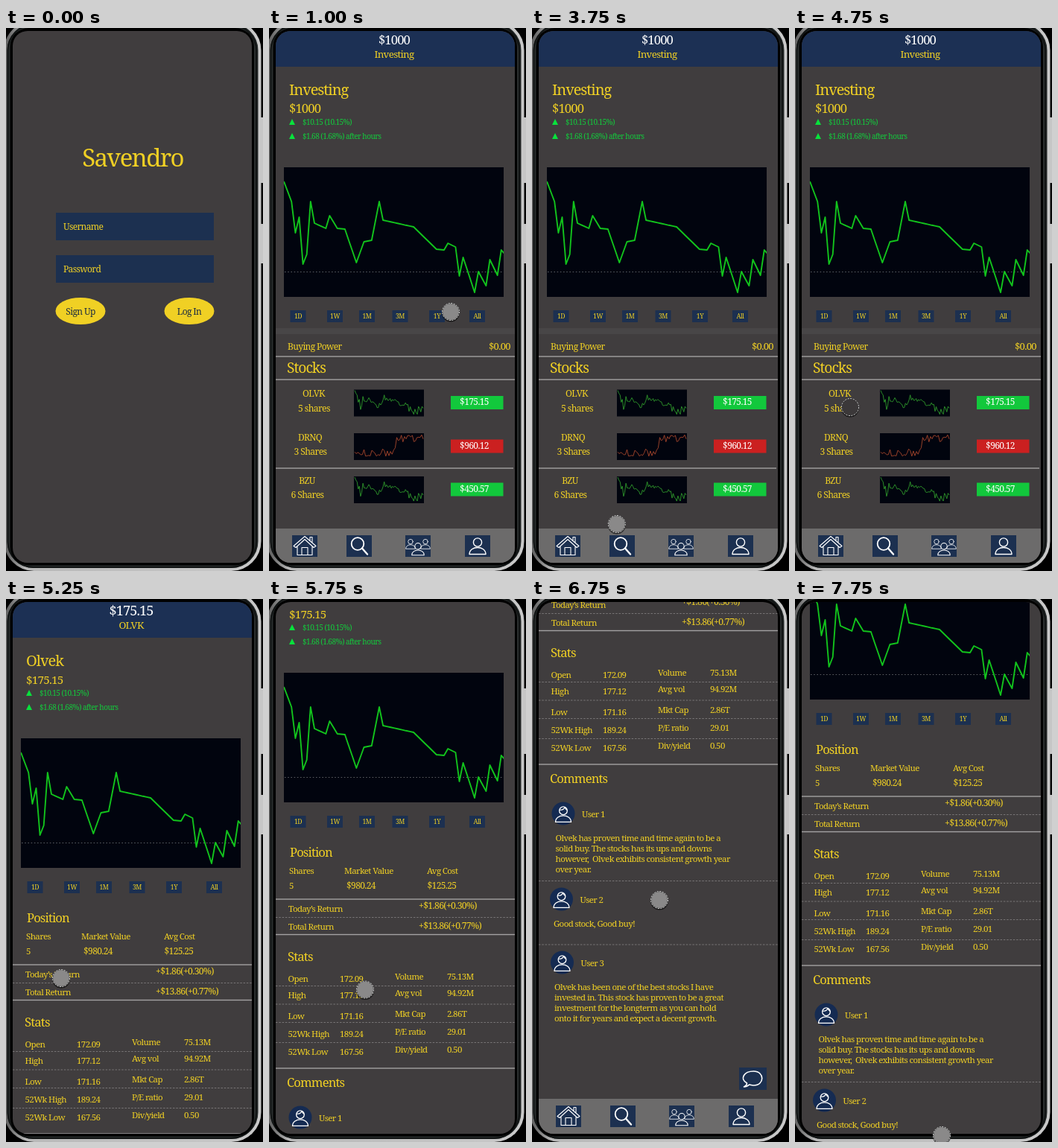
These frames come from a looping animation (345x729 px, 8 s). An HTML page:

```html
<!DOCTYPE html>
<html lang="en">
<head>
<meta charset="utf-8">
<title>Stock app</title>
<style>
html, body { margin: 0; width: 100%; height: 100%; overflow: hidden; background: #000; }
svg { display: block; width: 100%; height: 100%; }
text { font-family: "Noto Serif", serif; letter-spacing: -0.052em; white-space: pre; }
.icon { fill: none; stroke: #fff; stroke-width: 1.4; stroke-linejoin: round; stroke-linecap: round; }
</style>
</head>
<body>
<svg id="stage" viewBox="0 0 345 729"></svg>
<script>
(() => {
const LOOP = 8000, STEP = 250;
const YELLOW = '#f0d024', NAVY = '#1c3050', GREEN = '#12c83c', RED = '#cb2020', PAGE = '#403d3e';

// Drawing helpers
const rect = (x, y, w, h, fill, more = '') =>
  `<rect x="${x}" y="${y}" width="${w}" height="${h}" fill="${fill}" ${more}/>`;
const text = (x, y, str, size = 11.5, fill = YELLOW, anchor = 'start') =>
  `<text x="${x}" y="${y}" font-size="${size}" fill="${fill}" text-anchor="${anchor}">${str}</text>`;
const mid = (x, y, str, size, fill) => text(x, y, str, size, fill, 'middle');
const rule = (y, x2 = 330) => rect(9, y - .7, x2 - 9, 1.4, '#a3a1a2');
const dashes = y =>
  `<path d="M9 ${y}H330" stroke="#777475" stroke-width="1" stroke-dasharray="2.5 1.8"/>`;
const at = (x, y, body, scale = 1) => `<g transform="translate(${x} ${y}) scale(${scale})">${body}</g>`;
const stroke = (d, width = 1.4) => `<path class="icon" d="${d}" style="stroke-width:${width}"/>`;

// Maths helpers
const smooth = p => { p = Math.min(1, Math.max(0, p)); return p * p * (3 - 2 * p); };
const noise = i => { const s = Math.sin(i * 12.9898 + 4) * 43758.5453; return s - Math.floor(s) - .5; };

// Linear interpolation through keys of the form [position, ...values]
function track(keys, pos) {
  const i = keys.findIndex(k => k[0] >= pos);
  if (i < 1) return (i ? keys[keys.length - 1] : keys[0]).slice(1);
  const a = keys[i - 1], b = keys[i], p = (pos - a[0]) / (b[0] - a[0]);
  return a.slice(1).map((v, j) => v + (b[j + 1] - v) * p);
}

// Charts: turning points as [sample, y]
const turns = [[0, 206], [2, 233], [3, 275], [4, 254], [5, 317], [6, 304], [7, 233], [8, 262], [11, 269],
  [12, 252], [14, 269], [16, 270], [19, 315], [21, 287], [23, 285], [25, 233], [26, 258], [34, 267],
  [40, 297], [42, 298], [43, 289], [45, 294], [46, 333], [47, 308], [50, 355], [51, 327], [53, 346],
  [54, 311], [56, 332], [57, 298], [58, 304]];
const samples = (n, f) => Array.from({ length: n }, (_, i) => f(i));
const prices = samples(59, i => track(turns, i)[0]);
const falling = prices.map((y, i) => (y - 200) * .22 + noise(i) * 4);
const rising = samples(45, i => 26 - 19 * smooth((i - 24) / 4) + noise(i) * 10);

const line = (ys, dx, color, width) =>
  `<polyline points="${ys.map((y, i) => `${(i * dx).toFixed(1)},${y.toFixed(1)}`).join(' ')}" fill="none"
    stroke="${color}" stroke-width="${width}" stroke-linejoin="round"/>`;

const chart = rect(20, 187, 295, 174, '#01040e') +
  '<path d="M21 327.5H315" stroke="#5a5d62" stroke-dasharray="1.6 2.6"/>' +
  `<g clip-path="url(#chartBox)">${at(20, 0, line(prices, 5.12, '#12c41c', 1.9))}</g>`;

const mini = (y, up) => {
  const ys = up ? falling : rising;
  return rect(114, y, 94, 36, '#01040e') +
    at(115, y, line(ys, 92 / (ys.length - 1), up ? '#2f9a2c' : '#a9472c', .9));
};

// Icons
const person = '<circle class="icon" cy="-5" r="5.6"/>' + stroke('M-11 11C-11-1 11-1 11 11Z');
const house = stroke('M-15 0L0-13L15 0L12 2L0-9L-12 2ZM-10 1V12H10V1M-4 12V2H4V12M7-8V-12H10V-5', 1.1);
const lens = '<circle class="icon" cx="-2" cy="-3" r="8.3" style="stroke-width:1.8"/>' + stroke('M4 3L11 11', 2.4);
const crowd = at(-10, -3, person, .58) + at(10, -3, person, .58) + at(0, 4, person, .75);
const bubble = stroke('M-8 6C-18 0-12-10 1-10C16-10 16 9 1 9C-2 9-4 8-5 8Q-8 11-12 11Q-8 9-8 6Z', 1.6);
const face = '<circle r="15.5" fill="#152b52"/>' + at(0, 1, person + stroke('M-5-6Q1-6 2-10Q3-7 5-6', 1.1), .95);

const navBar = (x, y) => rect(9, y, 321, 48, '#6c6b6b') +
  [[48, house], [121, lens], [200, crowd], [280, person]].map(([cx, icon]) =>
    rect(cx + x - 17, y + 9, 34, 29, NAVY) + at(cx + x, y + 23.5, icon)).join('');

// Pages
const login = mid(170, 186, 'Savendro', 33) +
  [['Username', 248], ['Password', 305]].map(([s, y]) =>
    rect(67, y, 212, 37, NAVY) + text(77, y + 23, s, 12)).join('') +
  [['Sign Up', 100], ['Log In', 246]].map(([s, x]) =>
    `<ellipse cx="${x}" cy="380" rx="33.5" ry="18" fill="${YELLOW}"/>` + mid(x, 384.5, s, 12, '#1c2c40')).join('');

const gain = (y, s) =>
  `<path d="M27 ${y + 4}L31 ${y - 4}L35 ${y + 4}Z" fill="#08e23c"/>` + text(45, y + 4, s, 10, '#12cc3c');

const overview = (price, size, label, name, sumSize) =>
  rect(9, 0, 321, 52, '#1c3054') +
  mid(168, 21.5, price, size, '#fff') + mid(168, 40, label, 13.4) +
  text(27, 90, name, 20) + text(27, 114, price, sumSize) +
  gain(126, '$10.15 (10.15%)') + gain(145, '$1.68 (1.68%) after hours') + chart +
  [['1D', 39], ['1W', 88.5], ['1M', 131.5], ['3M', 176], ['1Y', 225.5], ['All', 279.5]].map(([s, x]) =>
    rect(x - 10.5, 379, 21, 16, NAVY) + mid(x, 390, s, 8.6)).join('');

const stock = (x, y, name, count, up, price) =>
  mid(x, y, name, 12) + mid(x + .5, y + 19.5, count, 12.2) + mini(y - 9.5, up) +
  rect(244, y - 1, 70.5, 18, up ? GREEN : RED) + mid(275.5, y + 11, price, 12, '#fff');

const home = overview('$1000', 16.6, 'Investing', 'Investing', 16.6) +
  rect(9, 403, 321, 8, '#484647') +
  text(25, 431.5, 'Buying Power', 12) + text(295, 431.5, '$0.00', 13) + rule(441) +
  text(24, 463, 'Stocks', 19.3) + rule(472) +
  stock(60, 495, 'OLVK', '5 shares', true, '$175.15') +
  stock(55, 553.5, 'DRNQ', '3 Shares', false, '$960.12') + rule(591, 328) +
  stock(51, 611.5, 'BZU', '6 Shares', true, '$450.57') +
  navBar(0, 672);

const stats = [
  ['Open', '172.09', 602, 'Volume', '75.13M'],
  ['High', '177.12', 624, 'Avg vol', '94.92M'],
  ['Low', '171.16', 651.5, 'Mkt Cap', '2.86T'],
  ['52Wk High', '189.24', 675.5, 'P/E ratio', '29.01'],
  ['52Wk Low', '167.56', 700, 'Div/yield', '0.50']
].map(([a, b, y, c, d]) =>
  text(25.5, y, a) + text(95, y, b) + text(169, y - 2.6, c) + text(239, y - 2.6, d)).join('');

const comment = (x, y, user, lines) => at(x, y, face) + text(x + 25, y + 5, user) +
  lines.map((s, i) => text(x - 10.5, y + 36.5 + i * 14.3, s)).join('');

const detail = overview('$175.15', 18.3, 'OLVK', 'Olvek', 15.3) +
  text(28, 434, 'Position', 16.6) +
  text(27, 457, 'Shares') + text(101, 457, 'Market Value') + text(212, 457, 'Avg Cost') +
  text(27, 477, '5') + text(104, 477, '$980.24', 12) + text(212.5, 477, '$125.25', 12) + rule(491) +
  text(26, 508, 'Today’s Return') + text(201, 504, '+$1.86(+0.30%)', 12.2) + dashes(515.5) +
  text(26, 532, 'Total Return') + text(201, 531, '+$13.86(+0.77%)', 12.2) + rule(538.5) +
  text(25, 574, 'Stats', 16.8) + stats + [607.5, 632, 656.5, 683.5].map(dashes).join('') + rule(718) +
  text(24, 743, 'Comments', 16.6) +
  comment(42, 784, 'User 1', ['Olvek has proven time and time again to be a',
    'solid buy. The stocks has its ups and downs', 'however,  Olvek exhibits consistent growth year', 'over year.']) +
  dashes(874.5) +
  comment(39.5, 899, 'User 2', ['Good stock, Good buy!']) + dashes(960) +
  comment(40.5, 984, 'User 3', ['Olvek has been one of the best stocks I have',
    'invested in. This stock has proven to be a great', 'investment for the longterm as you can hold',
    'onto it for years and expect a decent growth.']) +
  rect(278, 1125, 37, 30, NAVY) + at(296.5, 1140, bubble) +
  navBar(1, 1167);

const phone = rect(341, 120, 4, 88, '#c6c6c6') + rect(341, 263, 4, 53, '#c6c6c6') +
  rect(-.5, -8, 341, 735, '#222626', 'rx="38" stroke="url(#metal)" stroke-width="4"') +
  rect(2.5, -4, 333.5, 728, '#2a2e2e', 'rx="34" stroke="#111414" stroke-width="2"') +
  rect(5.5, 0, 327.5, 721.5, '#000', 'rx="25"') + rect(9, 4, 321, 714, PAGE, 'rx="20"');

document.getElementById('stage').innerHTML = `
  <defs>
    <linearGradient id="metal"><stop offset=".01" stop-color="#666"/><stop offset=".08" stop-color="#b8b8b8"/>
      <stop offset="1" stop-color="#c8c8c8"/></linearGradient>
    <clipPath id="screenBox">${rect(9, 4, 321, 714, '#000', 'rx="20"')}</clipPath>
    <clipPath id="chartBox">${rect(20, 187, 295, 174, '#000')}</clipPath>
  </defs>
  ${rect(0, 0, 345, 729, '#000')}${phone}
  <g clip-path="url(#screenBox)"><g id="login">${login}</g><g id="home">${home}</g><g id="detail">${detail}</g></g>
  <g id="cursor"><circle cy="1.5" r="12" fill="#000" opacity=".6"/><circle id="dot" r="11.5" stroke="#222"/>
    <circle r="11.5" fill="none" stroke="#d5d5d5" stroke-dasharray="2.2 1.4"/></g>`;

// Motion: pointer stops as [ms, x, y]
const stops = [[250, 285, 600], [750, 244, 381], [1250, 244, 381], [1500, 277, 435], [1750, 260, 430],
  [2000, 260, 430], [2250, 181, 601], [3250, 132, 719], [3500, 132, 719], [4500, 59, 507], [4750, 74, 509],
  [5250, 74, 509], [6250, 184, 540], [6750, 171, 404], [7250, 180, 450], [7750, 197, 720]];
const scrollAt = t => 496 * smooth((t - 5500) / 930) - 270 * smooth((t - 7250) / 500);

const el = id => document.getElementById(id);
const show = (id, on) => el(id).setAttribute('display', on ? 'inline' : 'none');
const move = (id, x, y) => el(id).setAttribute('transform', `translate(${x} ${y})`);

function draw(ms) {
  const t = Math.floor(ms % LOOP / STEP) * STEP;
  show('login', t < 1000);
  show('home', t >= 1000 && t < 5000);
  show('detail', t >= 5000);
  show('cursor', t >= 250);
  move('detail', 0, -Math.round(scrollAt(t)));
  move('cursor', ...track(stops, t));
  el('dot').setAttribute('fill', t === 750 || t === 4750 ? '#3b3839' : '#8a8989');
}

let start;
function tick(now) {
  start ??= now;
  draw(now - start);
  requestAnimationFrame(tick);
}
draw(0);
requestAnimationFrame(tick);
})();
</script>
</body>
</html>
```
